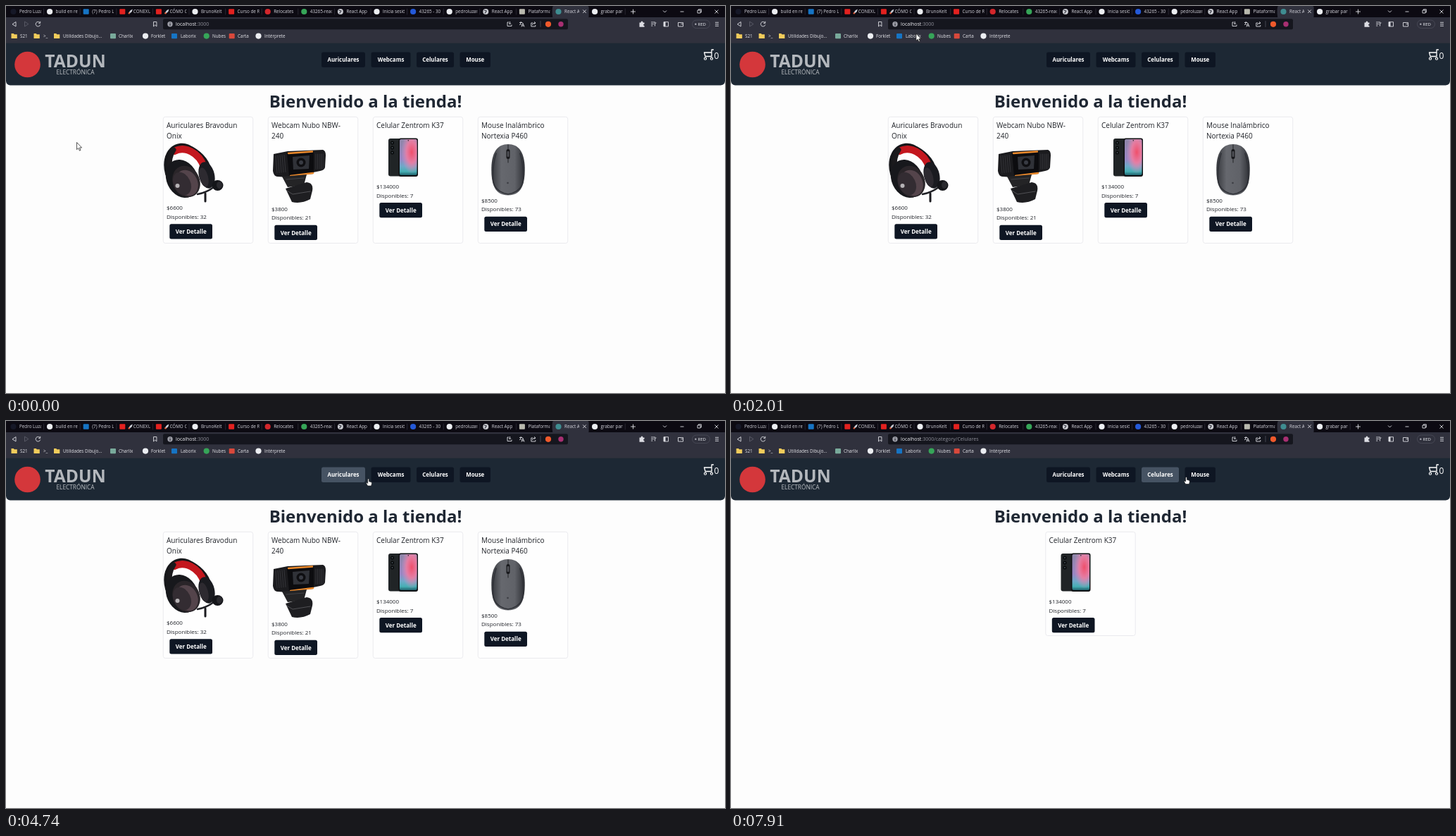
Recreate the animation shown at these times as an HTML page. Size 1021 by 549 pixels, loop 8000 ms.

```html
<!DOCTYPE html>
<html lang="es">
<head>
<meta charset="utf-8">
<title>Tienda</title>
<style>
html, body { margin: 0; width: 100%; height: 100%; overflow: hidden; background: #fdfdfd; }
svg { display: block; }
text { font-family: "Open Sans", "Noto Sans", sans-serif; white-space: pre; }
.line { fill: none; stroke: #dcdde3; stroke-width: .9; }
</style>
</head>
<body>
<svg id="stage" width="100%" height="100%" viewBox="0 0 1021 549"></svg>
<script>
const stage = document.getElementById('stage');
const text = (x, y, s, size, fill, more = '') => `<text x="${x}" y="${y}" font-size="${size}" fill="${fill}" ${more}>${s}</text>`;
const rect = (x, y, w, h, fill, r = 0, more = '') => `<rect x="${x}" y="${y}" width="${w}" height="${h}" rx="${r}" fill="${fill}" ${more}/>`;
const dot = (x, y, r, fill) => `<circle cx="${x}" cy="${y}" r="${r}" fill="${fill}"/>`;
const oval = (x, y, rx, ry, turn, fill) => `<ellipse cx="${x}" cy="${y}" rx="${rx}" ry="${ry}" fill="${fill}" transform="rotate(${turn} ${x} ${y})"/>`;
const shape = (d, fill) => `<path d="${d}" fill="${fill}"/>`;
const line = (d, stroke, width = .9) => `<path d="${d}" fill="none" stroke="${stroke}" stroke-width="${width}" stroke-linecap="round" stroke-linejoin="round"/>`;
const icon = d => `<path class="line" d="${d}"/>`;
const bold = 'font-weight="700"';
const WHITE = '#eceef2', RED = '#e3211f', BLUE = '#1674c4', GREEN = '#36a558';
const HEADER = '#1d2834', NAVY = '#0e1623', ACTIVE = '#465363';

// Browser chrome
const globe = (x, y) => dot(x, y, 4, '#c9cad0') + line(`M${x - 2} ${y - 2}l3 1-2 3`, '#33343f', 1.2);
const tabs = [
  ['Pedro Luzan', '#161827'], ['build en react', WHITE], ['(7) Pedro Luzan', BLUE, 1],
  ['CONEXUM', RED, 1, 1], ['CÓMO CREAR', RED, 1, 1], ['BrunoKelt', WHITE], ['Curso de React', RED, 1],
  ['Relocates', '#d3262b'], ['43265-react', GREEN], ['React App'], ['Inicia sesión', WHITE],
  ['43265 - 301', '#2459d8'], ['pedroluzan', WHITE], ['React App'], ['Plataforma', '#b9b9ae', 1],
  ['React App', '#3f8d91'], ['grabar pantalla', WHITE]
];
const mark = (x, y, fill, square) => !fill ? globe(x, y)
  : square ? rect(x - 4, y - 3.7, 8, 7.4, fill, 1) : dot(x, y, 4.1, fill);
const rocket = (x, y) => shape(`M${x} ${y + 2}L${x + 3} ${y - 2} ${x + 6} ${y - 3.5} ${x + 5} ${y} ${x + 1.5} ${y + 3}z`, '#c9ccd4')
  + dot(x + 1, y + 2.2, 1.2, '#e05a36');

function tabStrip() {
  return tabs.map(([name, fill, square, hasRocket], i) => {
    const left = 2 + 51.6 * i, active = i === 15;
    return (active ? rect(left, 0, 51.6, 17, '#30313d', 2) : line(`M${left + 51.6} 4V12`, '#3c3b47', .6))
      + mark(left + 8.5, 8, fill, square) + (hasRocket ? rocket(left + 17, 8) : '')
      + `<svg x="${left + 16}" y="0" width="${active ? 22 : 32}" height="16">`
      + text(hasRocket ? 8 : 1, 10.3, name, 6.3, '#d6d6de') + '</svg>';
  }).join('') + line('M819.5 5.7l4 4m0-4l-4 4M887.5 8h6m-3-3v6', '#e3e3e8')
    + icon('M933 6.5l2.5 2.5 2.5-2.5M957.5 8h5M982 6h4v4h-4zM983.3 6v-1.2h4V9H986M1006.5 5.5l5 5m0-5l-5 5');
}

function toolbar() {
  return icon('M14 22.5v6.5L9 25.8zM48 23.5a3.3 3.3 0 1 0 .7 3M48.7 21.8v2.6h-2.6M209.5 22.5h4.4v6.5l-2.2-2-2.2 2z')
    + line('M26.5 22.5v6.5l5-3.2z', '#5c5d69') + rect(223, 18.2, 575, 15, '#15161e', 2)
    + dot(233, 25.8, 3.7, '#9c9da6') + line('M233 25.5v2M233 23.7v.1', '#15161e', 1)
    + `<text x="241" y="28.3" font-size="7" fill="#eeeef2">localhost<tspan id="path" fill="#8d8e98"></tspan></text>`
    + icon('M714 23h-2v5.5h6v-2M715.5 22v4m-1.5-1.5l1.5 1.5 1.5-1.5M729 23.5h4.5M731.2 22v1.5q0 2-2.2 3.5M730 25l2 2M732 29.5l2-5 2 5m-3.2-1.5h2.5M748 24h-2.2v5h6v-2M747.5 27q0-3 4-3M750 22.3l2 1.7-2 1.7')
    + line('M759 21.5v8', '#5b5c68', .7) + dot(770, 25.8, 4.1, '#f0592b') + dot(788, 25.8, 3.7, '#a82f72')
    + shape('M899.5 23.5h2q0-2 1.5-2t1.5 2h2v2q-1.5.3-1.5 1.3t1.5 1.2v1.8h-7z', '#dcdde3')
    + icon('M916 23h6M916 25.5h4M916 28h2.5M921.5 28.5v-4.5h2M934 22.7h6.5v6.3H934zM954.5 23.5h7v5.5h-7zM958.5 25.5h3M1007 23.3h5M1007 25.8h5M1007 28.3h5')
    + rect(934, 22.7, 2.5, 6.3, '#dcdde3') + rect(974.5, 20, 25, 11.5, 'none', 5.7, 'stroke="#50515e" stroke-width=".7"')
    + dot(979.3, 25.8, 1.2, '#a9aab3') + text(982.5, 28, 'RED', 6, WHITE);
}

const folder = x => shape(`M${x} 39h3.3l1 1.2h4v5.8h-8.3z`, '#f2cc5b');
function bookmarks() {
  const label = (x, s) => text(x, 44.8, s, 6.3, '#e6e6eb');
  return folder(7.5) + label(20, 'S21') + folder(39.5) + label(53, '&gt;_') + folder(68) + label(81, 'Utilidades Dibujo...')
    + mark(152, 42.6, '#79aa9b', 1) + label(160, 'Charlix') + mark(198, 42.6, WHITE) + label(206, 'Forklet')
    + mark(239, 42.6, BLUE, 1) + label(248, 'Laborix') + mark(284.7, 42.6, GREEN) + label(293, 'Nubes')
    + mark(320.7, 42.6, '#d9483b', 1) + label(329, 'Carta') + mark(358.5, 42.6, WHITE) + label(367, 'Intérprete');
}

// Shop
const nav = [['Auriculares', 448, 62], ['Webcams', 518.5, 56], ['Celulares', 583, 53], ['Mouse', 644.5, 43.5]];
const hotspots = [...nav.map(([, x, w]) => [x, 65.5, w, 21.5]), [277.5, 36, 33.5, 13]];

const header = () => rect(0, 46, 1021, 66.4, HEADER, 6)
  + dot(30.5, 83, 18.3, '#d4373b') + text(98.5, 87.3, 'TADUN', 24.6, '#b4b8bd', bold + ' text-anchor="middle"')
  + text(98.5, 96.8, 'ELECTRÓNICA', 8.3, '#bcc0c4', 'text-anchor="middle"')
  + nav.map(([name, x, w], i) => rect(x, 65.5, w, 21.5, NAVY, 2.5, `id="hot${i}"`)
    + text(x + w / 2, 79.2, name, 7.9, '#fff', bold + ' text-anchor="middle"')).join('')
  + line('M1004.5 62H1002V71.5H993L991.5 66H1002', '#fff', 1.3)
  + `<g fill="${HEADER}" stroke="#fff" stroke-width="1.1"><circle cx="993" cy="74.7" r="1.6"/><circle cx="1002" cy="74.7" r="1.6"/></g>`
  + text(1005.5, 75, '0', 12, '#fff');

const headset = line('M230 238C222 208 243 190 263 203C279 212 287 224 289 238', '#16171a', 8)
  + line('M239 206C254 198 274 208 281 228', '#c3171e', 10)
  + line('M232 232Q231 214 238 204', '#1b1a1d', 7)
  + oval(285, 240, 11, 19, -14, '#1a1b20') + oval(281, 243, 6, 14, -14, '#2d2a30')
  + oval(250, 245, 22, 28, -25, '#17181c') + oval(256, 249, 19, 23, -25, '#2a2529')
  + oval(257, 251, 15, 19, -25, '#54444b') + oval(250, 252, 12, 17, -25, '#332c32')
  + dot(243.5, 255, 3, '#b6b3b6') + line('M272 267Q284 265 295 257', '#202126', 2.5) + line('M283 266v11', '#1b1b1f', 3)
  + oval(300.5, 254.5, 8, 7.5, 0, '#141519') + oval(303, 254, 4, 5, 0, '#29292e');

const webcam = shape('M380 210L400 206 450 204Q454 205 454 212L453 229Q452 233 446 234L402 243 385 242Q380 241 379 234z', '#1b1b1e')
  + shape('M399 209L437 206 437 238 402 241z', '#0c0c0f')
  + [0, 1, 2, 3, 4].map(i => line(`M${383 + i * 3} ${213 - i * .4}l2 24M${440 + i * 2.5} 210v21`, '#3b3b40', .8)).join('')
  + shape('M407 214L431 212 430 231 408 232z', '#303238') + dot(419, 222, 6.5, '#0e0e11') + dot(419, 222, 3, '#383b43')
  + line('M401 209L435 206.5M404 241L436 237', '#ed8a2b', 2.3)
  + shape('M392 242L427 239 423 254 400 257z', '#242426') + line('M398 246l25-2', '#434347', 1)
  + shape('M397 259L427 250Q437 251 435 262L432 274Q419 281 406 278z', '#1e1e21') + line('M399 262l8 5 25-4', '#515155', 1);

const phone = rect(543, 188, 19, 53.5, '#202426', 3) + [194, 201, 208].map(y => dot(548.5, y, 2.5, '#07090a') + dot(548.5, y, 1, '#465158')).join('')
  + rect(557.5, 187.5, 27.5, 54.5, '#101113', 3) + rect(559, 189, 24.5, 51, 'url(#sky)', 2)
  + rect(559, 189, 24.5, 51, 'url(#glow)', 2) + dot(571.3, 190.8, .8, '#151518');

const mouse = shape('M713 196C728 196 735 207 736.5 225C738 253 732 268.5 713 268.5C694 268.5 688 253 689.5 225C691 207 698 196 713 196z', 'url(#shell)')
  + line('M696 209Q690 230 692 249Q695 264 713 267Q731 264 734 249Q736 230 730 209', '#303238', 1.6)
  + line('M713 197V222', '#27292d', 1.1)
  + rect(710.5, 203, 5, 14, '#17181b', 2.5) + rect(711.7, 206, 2.6, 8, '#515359', 1) + dot(712.5, 251, 1.3, '#3c3e44');

// lines of the title, price, stock, price baseline, card bottom when alone, picture
const products = [
  [['Auriculares Bravodun', 'Onix'], 6600, 32, 289, 336.5, headset],
  [['Webcam Nubo NBW-', '240'], 3800, 21, 290.6, 336.5, webcam],
  [['Celular Zentrom K37'], 134000, 7, 258.8, 304.5, phone],
  [['Mouse Inalámbrico', 'Nortexia P460'], 8500, 73, 278.5, 324.5, mouse]
];
const cardLeft = i => 223.3 + 149 * i;
const card = ([title, price, stock, base, , picture], i) => {
  const x = cardLeft(i);
  return `<g id="card${i}">` + rect(x, 157.3, 127.4, 179.2, '#fefefe', 3, `id="frame${i}" stroke="#e2e3e8" stroke-width=".7"`)
    + title.map((s, k) => text(x + 4.7, 173.3 + 15 * k, s, 10, '#202329')).join('') + picture
    + text(x + 4.7, base, '$' + price, 8, '#202329') + text(x + 4.7, base + 12.7, 'Disponibles: ' + stock, 8, '#202329')
    + rect(x + 9, base + 20.2, 60.7, 21.3, NAVY, 2.5)
    + text(x + 39.4, base + 33.9, 'Ver Detalle', 8, '#fff', bold + ' text-anchor="middle"') + '</g>';
};

const cursors = {
  arrow: '<path d="M0 0V10.2L2.3 8.1 3.9 11.7 5.5 11 4 7.5H7.1z" fill="#fff" stroke="#111" stroke-width=".7"/>',
  hand: '<path d="M-.9 .7Q0-.6.9.7V3.8L4.2 4.8Q5 5.2 4.8 7L4 10H-1L-3 6.6Q-3 5.1-1.6 5.8L-.9 6.5z" fill="#fff" stroke="#111" stroke-width=".6"/>',
  beam: '<path d="M-1.7-4H1.7M0-4V4M-1.7 4H1.7" fill="none" stroke="#4a4a4e" stroke-width=".8"/>'
};

stage.innerHTML = `<defs>
  <linearGradient id="sky" x2="0" y2="1"><stop offset="0" stop-color="#8f86a8"/><stop offset=".55" stop-color="#9a86c4"/><stop offset=".75" stop-color="#6fa9c9"/><stop offset=".9" stop-color="#45b0b4"/><stop offset="1" stop-color="#1f5f6a"/></linearGradient>
  <radialGradient id="glow" cx=".7" cy=".36" r=".6"><stop offset="0" stop-color="#f04f6b"/><stop offset=".5" stop-color="#ee7ca0" stop-opacity=".9"/><stop offset="1" stop-color="#d993c4" stop-opacity="0"/></radialGradient>
  <linearGradient id="shell"><stop offset="0" stop-color="#35373c"/><stop offset=".3" stop-color="#66686e"/><stop offset=".7" stop-color="#606268"/><stop offset="1" stop-color="#2d2f34"/></linearGradient>
  </defs>` + rect(0, 0, 1021, 549, '#fdfdfd') + header()
  + rect(0, 0, 1021, 17, '#0c0a12') + rect(0, 16, 1021, 36.7, '#30313d')
  + rect(277.5, 36, 33.5, 13, 'none', 2, 'id="hot4"')
  + tabStrip() + toolbar() + bookmarks()
  + text(510.5, 143.8, 'Bienvenido a la tienda!', 24, '#1f2733', bold + ' text-anchor="middle"')
  + products.map(card).join('')
  + Object.entries(cursors).map(([name, d]) => `<g id="${name}">${d}</g>`).join('');

// Pointer path: time, x, y, and the pointer kind from then on
const track = [
  [0, 100.5, 193.5, 'arrow'], [40, 100.5, 193.5], [200, 112, 197], [340, 112, 197], [600, 246, 183, 'beam'],
  [670, 270.5, 181], [870, 270.5, 181], [1000, 286, 140, 'arrow'], [1440, 308, 46], [1480, 310, 37, 'beam'],
  [1500, 311, 33], [1670, 306, 26], [1870, 306, 26], [1950, 280, 34, 'arrow'], [2520, 120, 82, 'hand'],
  [2670, 87.5, 85], [2710, 87.5, 85], [2940, 96, 90], [3340, 96, 90], [3390, 140, 150, 'arrow'],
  [3540, 330, 338], [3840, 330, 338], [4040, 440, 320], [4270, 440, 320], [4410, 476, 100, 'hand'],
  [4440, 480, 83], [4640, 480, 83], [4740, 514.5, 82], [4980, 545, 83], [5310, 545, 83], [5340, 547, 82],
  [5480, 547, 82], [5640, 547, 81], [6480, 547, 81], [6610, 592, 81], [6940, 592, 81], [7180, 610, 82],
  [7870, 610, 82], [7910, 646.5, 79.5]
];
function pointer(t) {
  let i = track.length - 1;
  while (i && track[i][0] > t) i--;
  const a = track[i], b = track[i + 1] || a;
  const k = b === a ? 0 : Math.max(0, t - a[0]) / (b[0] - a[0]);
  const kind = track.slice(0, i + 1).map(p => p[3]).filter(Boolean).pop();
  return { x: a[1] + (b[1] - a[1]) * k, y: a[2] + (b[2] - a[2]) * k, kind };
}

const get = id => document.getElementById(id);
function draw(t) {
  const now = pointer(t), seen = pointer(t - 60); // hover trails the pointer slightly
  for (const name in cursors) {
    get(name).setAttribute('display', name === now.kind ? 'inline' : 'none');
    get(name).setAttribute('transform', `translate(${now.x} ${now.y})`);
  }
  hotspots.forEach(([x, y, w, h], i) => {
    const over = seen.x >= x && seen.x <= x + w && seen.y >= y && seen.y <= y + h;
    get('hot' + i).setAttribute('fill', i < 4 ? (over ? ACTIVE : NAVY) : over ? '#454651' : 'none');
  });
  const page = t < 5840 ? -1 : t < 7480 ? 1 : 2;
  get('path').textContent = ':3000' + (page < 0 ? '' : '/category/' + nav[page][0]);
  products.forEach((p, i) => {
    get('card' + i).setAttribute('display', page < 0 || page === i ? 'inline' : 'none');
    get('card' + i).setAttribute('transform', `translate(${page < 0 ? 0 : 446.8 - cardLeft(i)} 0)`);
    get('frame' + i).setAttribute('height', (page < 0 ? 336.5 : p[4]) - 157.3);
  });
}

const start = performance.now();
function tick() {
  draw((performance.now() - start) % 8000);
  requestAnimationFrame(tick);
}
tick();
</script>
</body>
</html>
```
